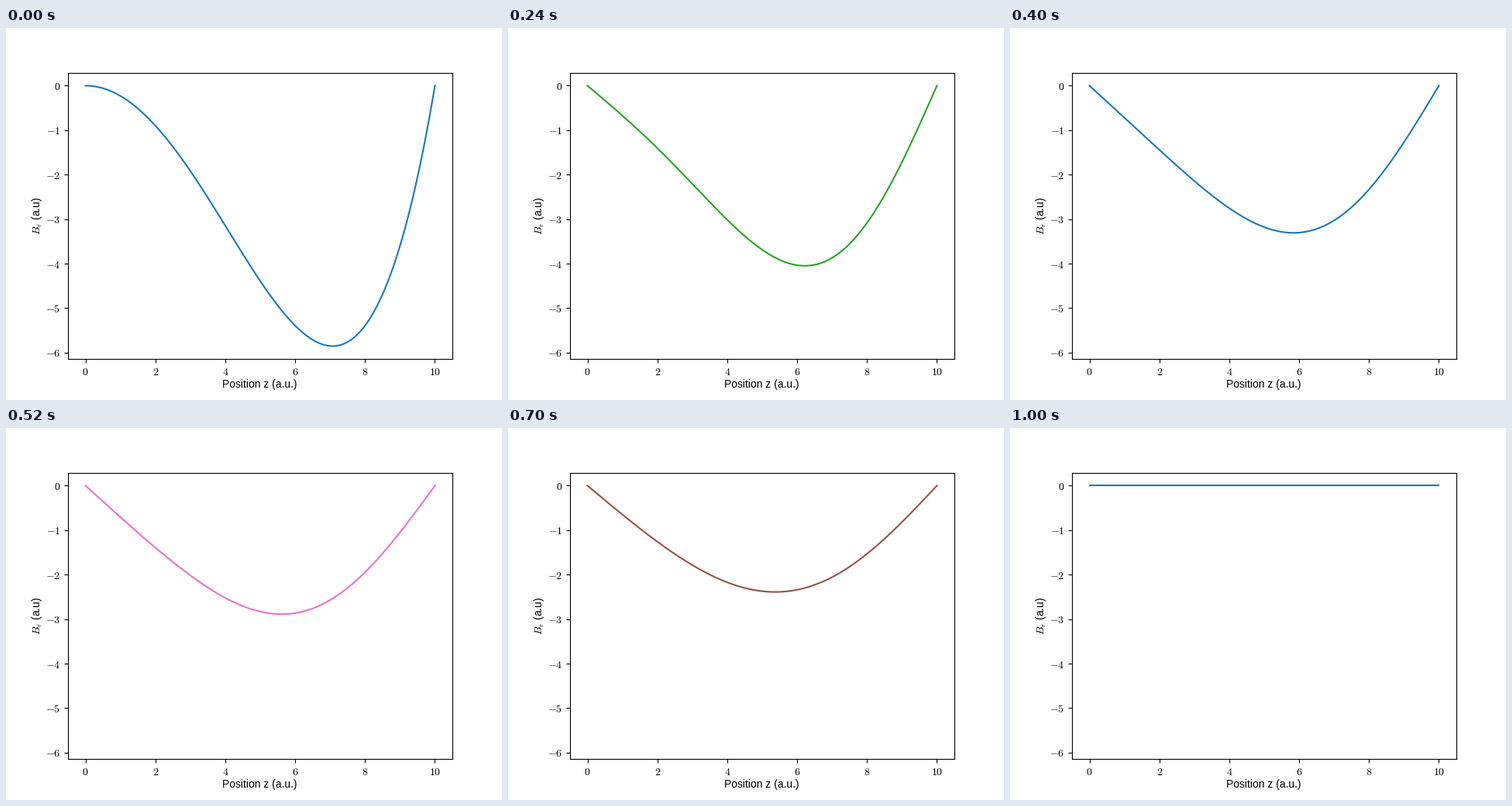
A matplotlib script for the animation above (1.02 s loop, 640 px wide and 480 px high).

```python
import numpy as np
import matplotlib.pyplot as plt
from matplotlib.animation import FuncAnimation

STEPS = 51        # the last step is an empty (zero) profile
INTERVAL = 20     # ms
L = 10.0
DEPTH = 5.853     # deepest point of the initial profile
RATE = 0.002      # diffusion per step, in units of L^2

plt.rcParams.update({
    "font.family": "Liberation Sans",
    "font.size": 10,
    "mathtext.fontset": "cm",
})

z = np.linspace(0, L, 201)
n = np.arange(1, 201)
k = n * np.pi
sign = (-1.0) ** n
# Sine series of 4 * DEPTH * (x^4 - x^2) on 0..1
coef = 8 * DEPTH * ((10 * sign + 2) / k**3 - 24 * (sign - 1) / k**5)
modes = np.sin(np.outer(z / L, k))


def profile(step):
    """Field after diffusing for the given number of steps."""
    if step == STEPS - 1:
        return np.zeros_like(z)
    return modes @ (coef * np.exp(-k**2 * RATE * step))


fig = plt.figure(figsize=(6.4, 4.8), dpi=100)
ax = fig.add_subplot()
ax.set_xlim(-0.05 * L, 1.05 * L)
ax.set_ylim(-1.05 * DEPTH, 0.05 * DEPTH)
xticks, yticks = range(0, 11, 2), range(-6, 1)
ax.set_xticks(xticks, [f"${t}$" for t in xticks])
ax.set_yticks(yticks, [f"${t}$" for t in yticks])
fig.text(327.2 / 640, 16 / 480, "Position z (a.u.)", ha="center", va="baseline")
fig.text(44 / 640, 238 / 480, "$B_r$ (a.u)", rotation=90,
         rotation_mode="anchor", ha="center", va="baseline")

line, = ax.plot(z, profile(0), lw=1.5)


def update(step):
    line.set_ydata(profile(step))
    line.set_color(f"C{step % 10}")
    return line,


anim = FuncAnimation(fig, update, frames=STEPS, interval=INTERVAL,
                     repeat=True, repeat_delay=0)
plt.show()
```
